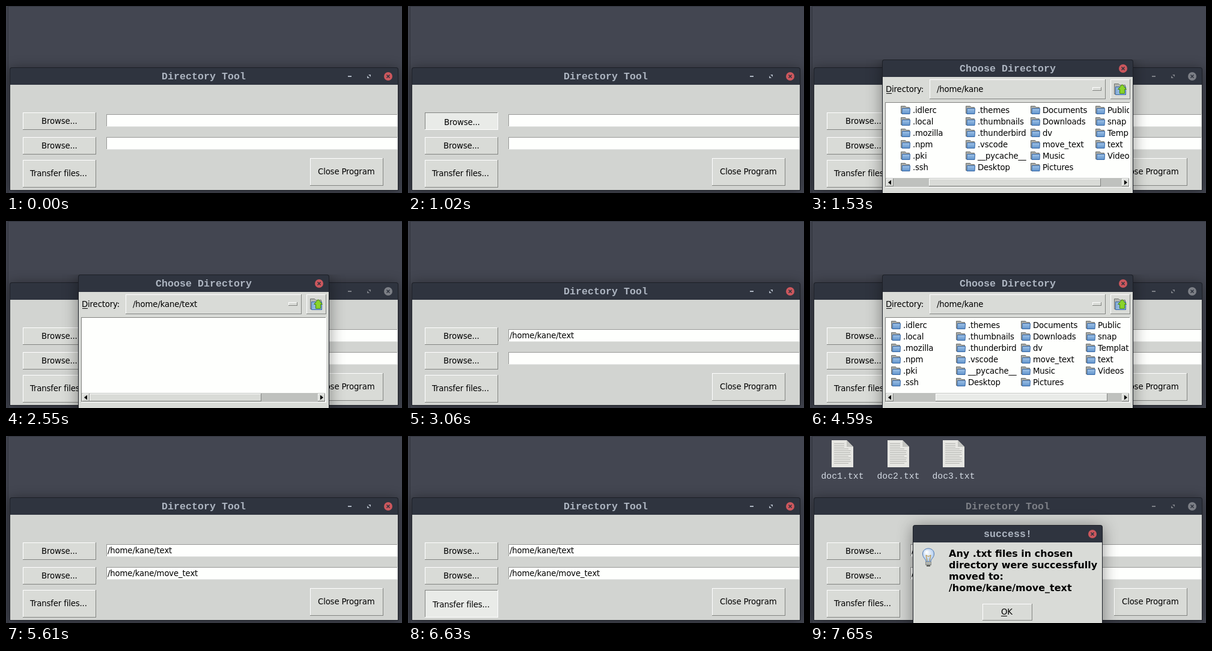
These frames come from a looping animation (659 px wide and 311 px high, 8 s). An HTML page with a canvas:

```html
<!DOCTYPE html>
<html lang="en">
<head>
<meta charset="utf-8">
<title>Directory Tool</title>
<style>
html, body { margin: 0; width: 100%; height: 100%; overflow: hidden; background: #434651; }
canvas { display: block; }
</style>
</head>
<body>
<canvas id="stage" width="659" height="311"></canvas>
<script>
const ctx = document.getElementById('stage').getContext('2d');
const W = 659, H = 311, LOOP = 8000;
const UI = '13.33px "DejaVu Sans", sans-serif';
const BOLD = 'bold 16px "DejaVu Sans", sans-serif';
const TITLE = 'bold 16.67px "Liberation Mono", monospace';
const LABEL = '14.8px "Liberation Mono", monospace';
const FACE = '#d9dbd7', ACTIVE = '#e9ebe8', BODY = '#d2d4d1', PAPER = '#fefffd';
const LIGHT = '#ffffff', DARK = '#828481', BAR = '#2f343f';
const BRIGHT = '#adb5c1', DIM = '#7c7f86';
const HOME = '/home/kane', FROM = HOME + '/text', TO = HOME + '/move_text';
const COLUMNS = [
  ['.idlerc', '.local', '.mozilla', '.npm', '.pki', '.ssh'],
  ['.themes', '.thumbnails', '.thunderbird', '.vscode', '__pycache__', 'Desktop'],
  ['Documents', 'Downloads', 'dv', 'move_text', 'Music', 'Pictures'],
  ['Public', 'snap', 'Templates', 'text', 'Videos']
];

// Each step holds until the next one starts.
const STEPS = [
  { at: 0 },
  { at: 510, hover: 0 },
  { at: 1020, press: 0 },
  { at: 1530, dir: HOME, scroll: 83 },
  { at: 2040, dir: HOME, scroll: 133 },
  { at: 2550, dir: FROM, empty: true, scroll: 0 },
  { at: 3060, from: FROM },
  { at: 3570, from: FROM, hover: 1 },
  { at: 4080, from: FROM, press: 1 },
  { at: 4590, from: FROM, dir: HOME, scroll: 99, drag: true },
  { at: 5100, from: FROM, dir: TO, empty: true, scroll: 0 },
  { at: 5610, from: FROM, to: TO },
  { at: 6120, from: FROM, to: TO, hover: 2 },
  { at: 6630, from: FROM, to: TO, press: 2 },
  { at: 7650, from: FROM, to: TO, done: true }
];

function rect(x, y, w, h, color) {
  ctx.fillStyle = color;
  ctx.fillRect(x, y, w, h);
}

function text(str, x, y, font = UI, color = '#000', align = 'left') {
  ctx.font = font;
  ctx.letterSpacing = font === UI ? '-0.18px' : '0px';
  ctx.fillStyle = color;
  ctx.textAlign = align;
  ctx.fillText(str, x, y);
}

function poly(points, fill, stroke) {
  ctx.beginPath();
  points.forEach(([x, y]) => ctx.lineTo(x, y));
  ctx.closePath();
  if (fill) { ctx.fillStyle = fill; ctx.fill(); }
  if (stroke) { ctx.strokeStyle = stroke; ctx.lineWidth = 1; ctx.stroke(); }
}

function disc(x, y, r, color) {
  ctx.beginPath();
  ctx.arc(x, y, r, 0, Math.PI * 2);
  ctx.fillStyle = color;
  ctx.fill();
}

// One pixel of edge: the first colour on the top and left, the second opposite.
function edged(x, y, w, h, fill, near, far) {
  rect(x, y, w, h, far);
  rect(x, y, w - 1, h - 1, near);
  rect(x + 1, y + 1, w - 2, h - 2, fill);
}

const raised = (x, y, w, h, fill = FACE) => edged(x, y, w, h, fill, LIGHT, DARK);
const sunken = (x, y, w, h, fill) => edged(x, y, w, h, fill, DARK, LIGHT);

function button(label, x, y, w, h, tx, ty, hover, press) {
  (press ? sunken : raised)(x, y, w, h, hover || press ? ACTIVE : FACE);
  text(label, tx + (press ? 1 : 0), ty + (press ? 2 : 0));
}

function closeMark(x, y, focused) {
  disc(x, y, 7, focused ? '#cc575d' : DIM);
  ctx.strokeStyle = BAR;
  ctx.lineWidth = 1.6;
  ctx.beginPath();
  for (const s of [-1, 1]) {
    ctx.moveTo(x - 2.5, y - 2.5 * s);
    ctx.lineTo(x + 2.5, y + 2.5 * s);
  }
  ctx.stroke();
}

function frame(x, y, w, h, body, blur, alpha, shadowTop = 0) {
  ctx.save();
  ctx.beginPath();
  ctx.rect(0, shadowTop, W, H);
  ctx.clip();
  ctx.shadowColor = `rgba(0,0,0,${alpha})`;
  ctx.shadowBlur = blur;
  ctx.shadowOffsetY = 2;
  ctx.beginPath();
  ctx.roundRect(x, y, w, h, [4, 4, 0, 0]);
  ctx.fillStyle = '#1c1f26';
  ctx.fill();
  ctx.restore();
  ctx.beginPath();
  ctx.roundRect(x + 1, y + 1, w - 2, 28, [3, 3, 0, 0]);
  ctx.fillStyle = BAR;
  ctx.fill();
  rect(x + 1, y + 29, w - 2, h - 30, body);
}

function page(x, label) {
  poly([[x, 7], [x + 25, 7], [x + 36, 18], [x + 36, 52], [x, 52]], '#e6e6e2');
  poly([[x + 25, 7], [x + 36, 18], [x + 25, 18]], '#c3c4c0');
  for (let i = 0; i < 12; i++) {
    const w = i < 3 ? 17 : [28, 27, 28, 24][i % 4];
    rect(x + 4, 12 + i * 3, w, 1, '#b3b4b0');
  }
  text(label, x + 18, 71, LABEL, '#d3dae3', 'center');
}

function desktop(s) {
  rect(0, 0, W, H, '#434651');
  rect(0, 0, W, 1, '#30333d');
  rect(0, 0, 3, H, '#3f424d');
  rect(3, 0, 1, H, '#31343d');
  if (s.done) [36, 129, 221].forEach((x, i) => page(x, `doc${i + 1}.txt`));
}

function field(y, value) {
  edged(167, y, 485, 21, PAPER, '#989997', '#e4e6e4');
  if (value) text(value, 169, y + 15);
}

function mainWindow(s) {
  const focused = !s.dir && !s.done;
  const mark = focused ? BRIGHT : DIM;
  frame(6, 102, 647, 205, BODY, 20, 0.4);
  text('Directory Tool', 329, 122, TITLE, mark, 'center');
  rect(569, 116, 6, 2, mark);
  poly([[603, 114], [607, 114], [607, 118]], mark);
  poly([[601, 116], [601, 120], [605, 120]], mark);
  closeMark(636, 117, focused);
  const is = (key, i) => s[key] === i;
  button('Browse...', 28, 177, 122, 29, 59, 196, is('hover', 0), is('press', 0));
  button('Browse...', 28, 218, 122, 29, 59, 237, is('hover', 1), is('press', 1));
  button('Transfer files...', 28, 256, 122, 46, 40, 283, is('hover', 2), is('press', 2));
  button('Close Program', 506, 253, 122, 46, 519, 280);
  field(180, s.from);
  field(218, s.to);
}

function folder(x, y) {
  poly([[x + .5, y + 1.5], [x + 7.5, y + 1.5], [x + 9.5, y + 3.5], [x + 14.5, y + 3.5],
    [x + 14.5, y + 13.5], [x + .5, y + 13.5]], '#a6a8a4', '#70726e');
  const fill = ctx.createLinearGradient(0, y + 6, 0, y + 14);
  fill.addColorStop(0, '#9cc0e6');
  fill.addColorStop(1, '#6496cd');
  poly([[x + 2.5, y + 5.5], [x + 15.5, y + 5.5], [x + 15, y + 14.5], [x + 2, y + 14.5]],
    fill, '#3465a4');
}

function upButton() {
  raised(500, 122, 33, 33);
  poly([[506.5, 129.5], [513.5, 129.5], [515.5, 131.5], [524.5, 131.5],
    [524.5, 146.5], [506.5, 146.5]], '#b5b7b2', '#70726e');
  poly([[508.5, 134.5], [525.5, 134.5], [525.5, 147.5], [508.5, 147.5]], '#8fb4dc', '#3465a4');
  poly([[519.5, 130.5], [526.5, 138.5], [523.5, 138.5], [523.5, 145.5],
    [515.5, 145.5], [515.5, 138.5], [512.5, 138.5]], '#8bd32a', '#428a08');
}

function fileList(s) {
  ctx.save();
  ctx.beginPath();
  ctx.rect(127, 162, 404, 124);
  ctx.clip();
  COLUMNS.forEach((names, col) => names.forEach((name, row) => {
    const x = 234 - s.scroll + col * 108, y = 165 + row * 19;
    folder(x, y);
    text(name, x + 20, y + 13);
  }));
  ctx.restore();
}

function scrollbar(offset, drag) {
  rect(126, 286, 405, 15, '#bfc1be');
  raised(127, 287, 12, 13);
  raised(519, 287, 12, 13);
  poly([[130, 293.5], [135, 289.5], [135, 297.5]], '#000');
  poly([[528, 293.5], [523, 289.5], [523, 297.5]], '#000');
  raised(139 + Math.round(offset * .708), 287, 286, 13, drag ? ACTIVE : FACE);
}

function chooser(s) {
  frame(120, 89, 418, 240, FACE, 26, 0.42, 89);
  text('Choose Directory', 329, 109, TITLE, BRIGHT, 'center');
  closeMark(521, 104, true);
  text('Directory:', 126, 143);
  rect(127, 145, 9, 1, '#000');
  raised(199, 122, 293, 33);
  text(s.dir, 211, 143);
  raised(470, 135, 15, 6);
  upButton();
  sunken(125, 160, 408, 142, PAPER);
  if (!s.empty) fileList(s);
  scrollbar(s.scroll, s.drag);
}

function bulb() {
  const glow = ctx.createRadialGradient(194, 193, 1, 197, 197, 11);
  glow.addColorStop(0, '#ffffff');
  glow.addColorStop(1, '#a9c6ea');
  ctx.beginPath();
  ctx.moveTo(193, 209);
  ctx.bezierCurveTo(193, 204, 187.5, 203, 187.5, 196);
  ctx.bezierCurveTo(187.5, 184, 206.5, 184, 206.5, 196);
  ctx.bezierCurveTo(206.5, 203, 201, 204, 201, 209);
  ctx.closePath();
  ctx.fillStyle = glow;
  ctx.fill();
  ctx.strokeStyle = '#4f79b2';
  ctx.lineWidth = 1;
  ctx.stroke();
  ctx.beginPath();
  ctx.moveTo(195, 208);
  [[193, 198], [196, 200], [198, 200], [201, 198], [199, 208]].forEach(p => ctx.lineTo(...p));
  ctx.strokeStyle = '#b98b2d';
  ctx.stroke();
  rect(192, 209, 10, 6, '#8b8e8a');
  rect(193, 210, 8, 1, '#d3d7cf');
  rect(193, 212, 8, 1, '#d3d7cf');
  rect(194, 215, 6, 2, '#555753');
}

function message() {
  frame(171, 148, 316, 200, FACE, 26, 0.42);
  text('success!', 329, 168, TITLE, BRIGHT, 'center');
  closeMark(470, 163, true);
  bulb();
  ['Any .txt files in chosen', 'directory were successfully', 'moved to:', TO]
    .forEach((line, i) => text(line, 231, 201 + i * 19, BOLD));
  button('OK', 287, 279, 83, 28, 318, 297);
  rect(318, 299, 10, 1, '#000');
}

function draw(now) {
  const t = now % LOOP;
  const s = STEPS.findLast(step => step.at <= t) || STEPS[0];
  desktop(s);
  mainWindow(s);
  if (s.dir) chooser(s);
  if (s.done) message();
}

const start = performance.now();
function tick() {
  draw(performance.now() - start);
  requestAnimationFrame(tick);
}
tick();
</script>
</body>
</html>
```
